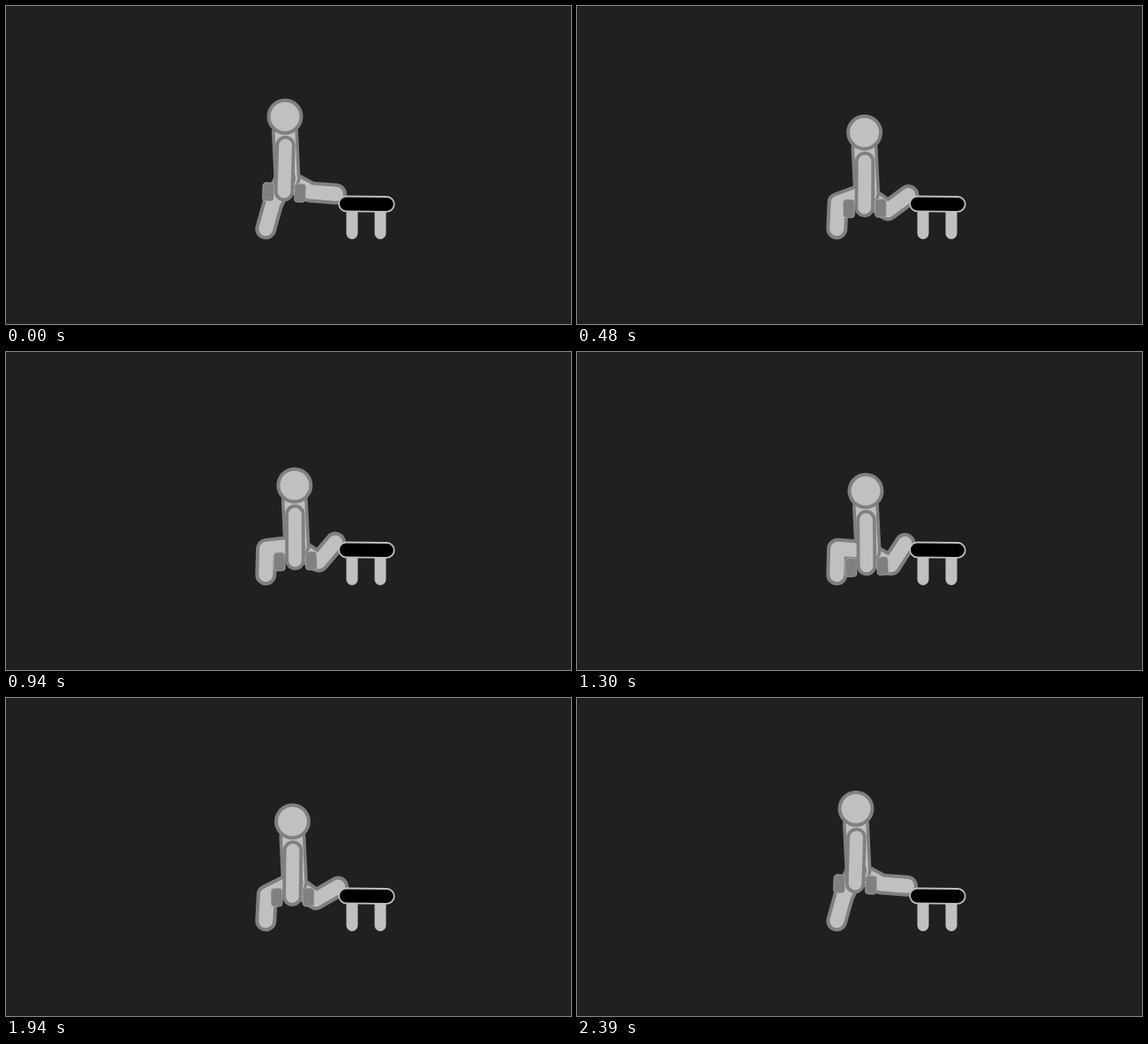
Write an HTML page with a canvas that moves like this. It is 640 px wide and 360 px high and loops after 2.7 s.

```html
<!DOCTYPE html>
<html lang="en">
<head>
<meta charset="utf-8">
<title>Split squat</title>
<style>
  html, body { margin: 0; width: 100%; height: 100%; overflow: hidden; background: #202020; }
  canvas { display: block; width: 640px; height: 360px; }
</style>
</head>
<body>
<canvas id="stage" width="640" height="360"></canvas>
<script>
const ctx = document.getElementById('stage').getContext('2d');
const BG = '#202020', SKIN = '#c0c0c0', EDGE = '#808080';
const LOOP = 2700;
// Steps of about 30 ms at which the squat slows, turns and ends
const SLOW = 16, LOW = 43, LAST = 79;
const { sin, sqrt, hypot, atan2, PI } = Math;

// 0 = standing, 1 = lowest
function depth(step) {
  if (step < SLOW) return 0.56 * step / SLOW;
  if (step < LOW) return 0.56 + 0.44 * (step - SLOW) / (LOW - SLOW);
  return 1 - ((step - LOW) / (LAST - LOW)) ** 1.12;
}

// Middle joint of a two-bone limb; side picks the way it bends
function joint([ax, ay], [bx, by], la, lb, side) {
  const dx = bx - ax, dy = by - ay, d = hypot(dx, dy);
  const along = (la * la - lb * lb + d * d) / (2 * d);
  const out = side * sqrt(Math.max(0, la * la - along * along));
  return [ax + (dx * along - dy * out) / d, ay + (dy * along + dx * out) / d];
}

function stroke(points, width, color) {
  ctx.beginPath();
  points.forEach(([x, y]) => ctx.lineTo(x, y));
  ctx.lineWidth = width;
  ctx.strokeStyle = color;
  ctx.stroke();
}

function limb(points, width, border = 4, edge = EDGE, fill = SKIN) {
  stroke(points, width, edge);
  stroke(points, width - 2 * border, fill);
}

function disc(x, y, r, color) {
  ctx.beginPath();
  ctx.arc(x, y, r, 0, PI * 2);
  ctx.fillStyle = color;
  ctx.fill();
}

function dumbbell(x, y, tilt) {
  ctx.save();
  ctx.translate(x, y);
  ctx.rotate(atan2(tilt, 36));
  ctx.fillStyle = EDGE;
  ctx.lineWidth = 0.9;
  ctx.strokeStyle = 'rgba(192,192,192,.6)';
  for (const side of [-18, 18]) {
    ctx.beginPath();
    ctx.roundRect(side - 6.5, -10.5, 13, 21, 4);
    ctx.fill();
    ctx.stroke();
  }
  ctx.restore();
}

function bench() {
  for (const x of [392, 424]) stroke([[x, 230], [x, 257.5]], 13, SKIN);
  limb([[385.5, 223.9], [431.3, 224.4]], 18.6, 1.8, SKIN, '#000');
}

function draw(step) {
  const u = depth(step);
  const x = 316 + 11 * u + 3.5 * sin(PI * u);
  const headY = 125.2 + 32.1 * u;
  const hip = [x, 195 + 30 * u];
  const footF = [294.3, 252.3];
  const footB = [374 + 5 * sin(PI * u) * (1 - u) - 2.5 * u * u, 212.8 + 4 * u * u];
  const kneeF = joint(footF, hip, 29.5, 32, -1);
  const kneeB = joint(hip, footB, 33, 29, 1);
  const hand = [x - 1 + 2 * u, headY + 84.8];

  ctx.fillStyle = BG;
  ctx.fillRect(0, 0, 640, 360);
  ctx.lineCap = ctx.lineJoin = 'round';

  limb([hip, kneeB, footB], 24);
  limb([[x, headY + 18], [x + 2.5, hip[1]]], 30, 3.6);
  limb([hip, kneeF, footF], 24);
  dumbbell(hand[0] + 0.2, hand[1] + 1, 1.2 - 3 * u);
  limb([[x + 0.5, headY + 32.7], hand], 22.4, 3.8);
  disc(x, headY, 20.5, EDGE);
  disc(x, headY, 16.5, SKIN);
  bench();
}

const start = performance.now();
function tick() {
  const t = (performance.now() - start) % LOOP;
  draw(Math.min(LAST, Math.floor(t / 30.2 + 0.2)));
  requestAnimationFrame(tick);
}
tick();
</script>
</body>
</html>
```
